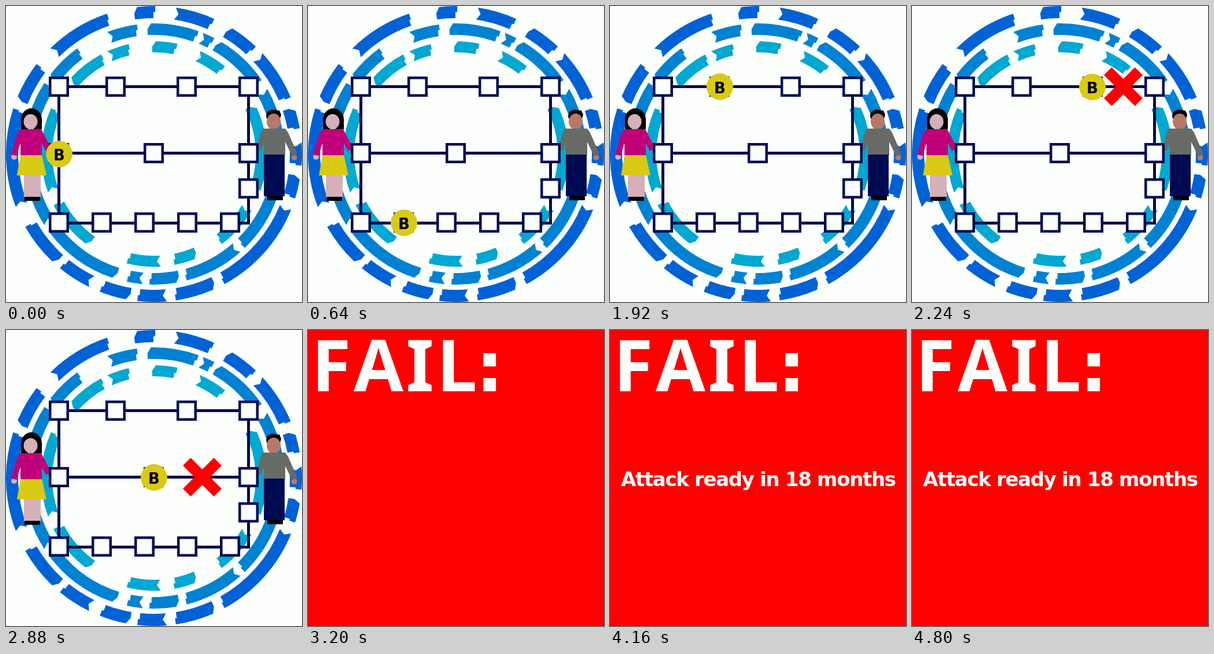
Animation of 512x512 px, one loop 5.44 s. Source, as an HTML page with a canvas:

```html
<!DOCTYPE html>
<html lang="en">
<head>
<meta charset="utf-8">
<title>Routing attack</title>
<style>
  html, body { margin: 0; width: 100%; height: 100%; overflow: hidden; background: #fdfffd; }
  canvas { display: block; width: 100vw; height: 100vh; }
</style>
</head>
<body>
<canvas id="stage" width="512" height="512"></canvas>
<script>
const ctx = document.getElementById('stage').getContext('2d');
const WHITE = '#fdfffd', NAVY = '#000a50', YELLOW = '#d9ca14', RED = '#ff0000';
const STEP = 320, LOOP = 5440;

// Dashed rings: start and end angles in degrees, clockwise from the top.
const rings = [
  { color: '#0062d5', inner: 235, outer: 256, dashes: [
    [-8, 0.5], [8.5, 24], [30.5, 43.5], [47, 67.5], [71.5, 80], [85.5, 94.5],
    [98.5, 107.5], [112, 151.5], [155, 171.5], [175, 186.5], [189.5, 201.5],
    [206, 219.5], [222, 240.5], [249, 288], [291.5, 307.5], [315.5, 341.5]] },
  { color: '#0082d2', inner: 206, outer: 226, dashes: [
    [-3, 20], [22, 27.5], [29.5, 55.5], [60, 80], [109, 136], [138.5, 165.5],
    [168.5, 182], [185, 192], [197, 233], [237, 303], [306, 324], [339, 352.5]] },
  { color: '#00a8d2', inner: 176, outer: 195, dashes: [
    [-1, 12], [24, 39], [64, 109], [120, 143], [157, 169.5], [176.5, 194],
    [215.5, 243], [250, 294], [311, 332], [335.5, 347]] }
];

const nodes = [
  [91.5, 139.5], [189.5, 139.5], [312.5, 139.5], [419.5, 139.5],
  [91.5, 254.5], [255.5, 254.5], [419.5, 254.5], [419.5, 315.5],
  ...[0, 1, 2, 3, 4].map(i => [91.5 + 74 * i, 374.5])
];

// Token position for each step, with the blocked link where there is one.
const home = { at: [92, 256] };
const steps = [
  home, { at: [92, 374] }, { at: [166, 375] }, { at: [240, 375], cross: [279.5, 376.5] },
  home, { at: [92, 140] }, { at: [190, 139.5] }, { at: [312, 140], cross: [365.5, 139.5] },
  home, { at: [256, 255], cross: [339.5, 254.5] }
];

function rect(color, x, y, w, h) {
  ctx.fillStyle = color;
  ctx.fillRect(x, y, w, h);
}

function oval(color, x, y, rx, ry = rx) {
  ctx.fillStyle = color;
  ctx.beginPath();
  ctx.ellipse(x, y, rx, ry, 0, 0, 2 * Math.PI);
  ctx.fill();
}

function shape(color, ...pts) {
  ctx.fillStyle = color;
  ctx.beginPath();
  for (let i = 0; i < pts.length; i += 2) ctx.lineTo(pts[i], pts[i + 1]);
  ctx.fill();
}

function line(color, width, x1, y1, x2, y2) {
  ctx.strokeStyle = color;
  ctx.lineWidth = width;
  ctx.beginPath();
  ctx.moveTo(x1, y1);
  ctx.lineTo(x2, y2);
  ctx.stroke();
}

function write(text, x, y, font, color, spacing = 0) {
  ctx.font = font;
  ctx.fillStyle = color;
  ctx.letterSpacing = spacing + 'px';
  ctx.fillText(text, x, y);
}

function dash({ color, inner, outer }, [from, to], index) {
  const rad = d => (d - 90) * Math.PI / 180;
  const mid = (inner + outer) / 2;
  const point = (r, d) => ctx.lineTo(256 + r * Math.cos(rad(d)), 256 + r * Math.sin(rad(d)));
  const notch = 360 / mid;
  const tail = index % 2 ? 0 : notch;
  ctx.fillStyle = color;
  ctx.beginPath();
  ctx.arc(256, 256, outer, rad(from + tail), rad(to));
  // Ragged ends: a step at one side, a swallowtail or a step at the other.
  point(mid, to);
  point(mid, to - notch / 2);
  ctx.arc(256, 256, inner, rad(to - notch / 2), rad(from), true);
  point(mid, from + (index % 2 ? notch : 0));
  ctx.fill();
}

function woman() {
  const skin = '#d5b0b8', top = '#c00078';
  oval('#000', 44, 196, 18, 19);
  rect('#000', 26, 196, 36, 17);
  rect(skin, 38, 205, 10, 10);
  oval(skin, 42.5, 200, 12, 13);
  oval(skin, 14, 261, 5);
  rect(skin, 31, 290, 29, 41);
  rect('#000', 32, 330, 27, 7);
  shape(top, 25, 213, 61, 213, 78, 246, 69, 251, 62, 237, 62, 259,
    25, 259, 25, 237, 18, 259, 9, 257, 19, 222);
  shape(YELLOW, 25, 258, 62, 258, 70, 293, 19, 293);
}

function man() {
  const skin = '#b87868', top = '#686a66';
  shape('#000', 450, 190, 452, 183, 460, 179, 473, 181, 476, 188, 474, 195, 451, 195);
  oval(skin, 463, 200, 12, 14);
  oval(skin, 498.5, 262, 5);
  shape(top, 444, 212, 483, 212, 488, 219, 504, 256, 495, 260, 483, 235, 483, 258,
    446, 258, 446, 236, 441, 250, 434, 250, 439, 224);
  rect(NAVY, 446, 257, 36, 72);
  rect('#000', 452, 329, 27, 7);
}

function network() {
  for (const y of [139.5, 254.5, 375.5]) line(NAVY, 5, 91.5, y, 422, y);
  for (const x of [91.5, 419.5]) line(NAVY, 5, x, 139.5, x, 375.5);
  for (const [x, y] of nodes) {
    rect(NAVY, x - 17.5, y - 17.5, 35, 35);
    rect(WHITE, x - 13, y - 13, 26, 26);
  }
}

function scene({ at: [x, y], cross }) {
  rect(WHITE, 0, 0, 512, 512);
  for (const ring of rings) ring.dashes.forEach((d, i) => dash(ring, d, i));
  woman();
  man();
  network();
  if (cross) {
    const [cx, cy] = cross, r = 26.8;
    line(RED, 19, cx - r, cy - r, cx + r, cy + r);
    line(RED, 19, cx - r, cy + r, cx + r, cy - r);
  }
  oval(YELLOW, x, y, 23);
  ctx.textAlign = 'center';
  write('B', x, y + 11, 'bold 26px "DejaVu Sans", sans-serif', '#000');
  ctx.textAlign = 'left';
}

function failure(showText) {
  rect(RED, 0, 0, 512, 512);
  ctx.fontKerning = 'none';
  write('FAIL', 6, 106, 'bold 124.6px "Noto Sans", sans-serif', WHITE, 4.5);
  write(':', 290, 106, 'bold 122px "DejaVu Sans", sans-serif', WHITE);
  if (showText) {
    write('Attack ready in 18 months', 19, 270,
      'bold 34px "DejaVu Sans", sans-serif', WHITE, -1.33);
  }
}

function draw() {
  const step = Math.floor(performance.now() % LOOP / STEP);
  if (step < steps.length) scene(steps[step]);
  else failure(step >= 15 || step % 2 === 1);
  requestAnimationFrame(draw);
}
draw();
</script>
</body>
</html>
```
